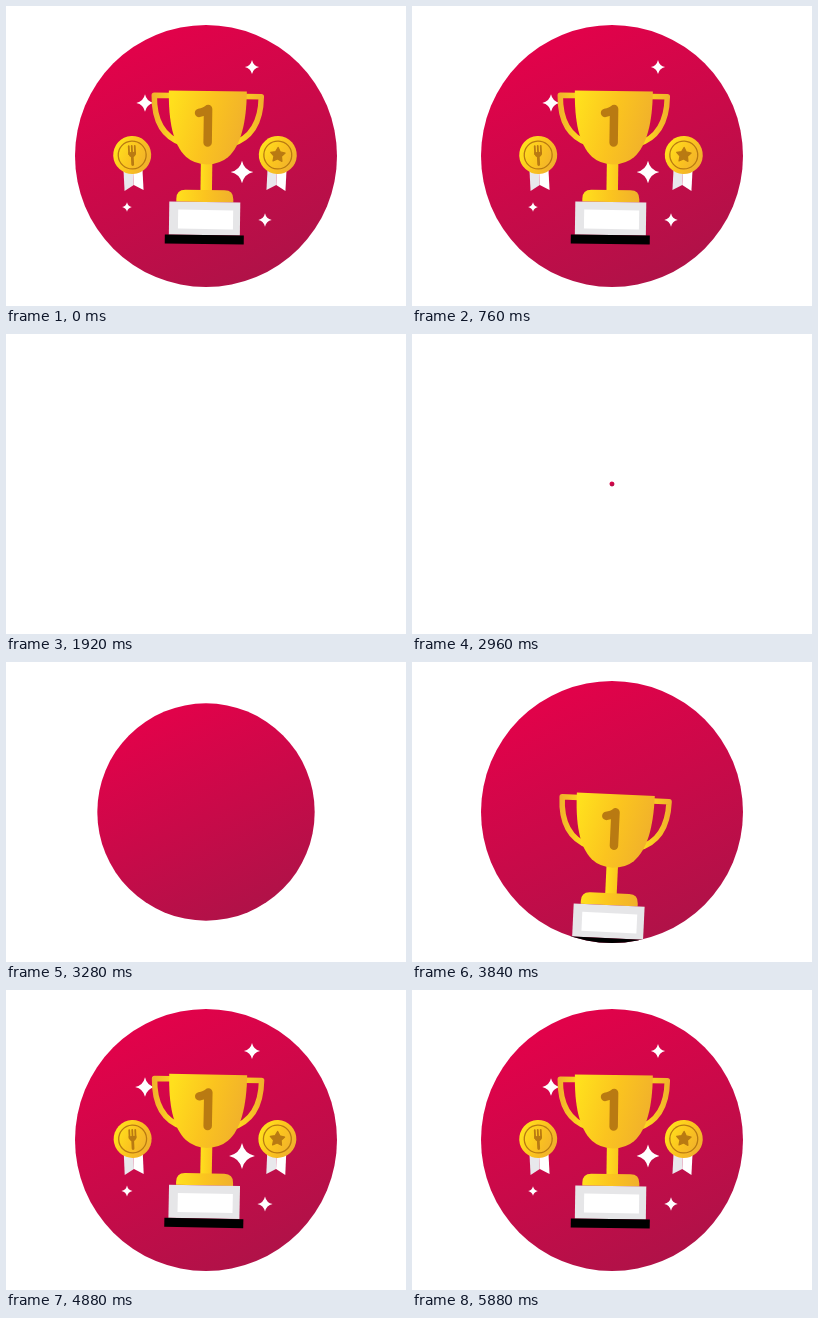
Animation, 400 px wide and 300 px high, one loop 5.92 s. Source, as an HTML page with a canvas:

```html
<!DOCTYPE html>
<html lang="en">
<head>
<meta charset="utf-8">
<title>Trophy</title>
<style>
html, body { margin: 0; width: 100%; height: 100%; overflow: hidden; background: #fff; }
canvas { display: block; width: 400px; height: 300px; }
</style>
</head>
<body>
<canvas id="stage"></canvas>
<script>
const canvas = document.getElementById('stage');
const ratio = window.devicePixelRatio || 1;
canvas.width = 400 * ratio;
canvas.height = 300 * ratio;
const c = canvas.getContext('2d');

const LOOP = 5920, STEP = 40, RADIUS = 131;
const BROWN = '#b97a12', YELLOW = '#ffe01d', GOLD = '#fbc41f', ORANGE = '#f0b02c';

// Progress from 0 to 1, linear and eased.
const ramp = (t, begin, time) => Math.min(1, Math.max(0, (t - begin) / time));
const ease = (t, begin, time) => {
  const u = ramp(t, begin, time);
  return u * u * (3 - 2 * u);
};

// 1 while a part is on stage, 0 while it is away.
const shown = (t, leave, leaveTime, enter, enterTime) =>
  1 - ease(t, leave, leaveTime) + ease(t, enter, enterTime);

// Damped swing that follows the arrival of the trophy.
function spring(t) {
  const u = Math.max(0, t - 3980);
  return Math.exp(-u / 250) * Math.sin(2 * Math.PI * u / 1000);
}

function gradient(x0, y0, x1, y1, ...colors) {
  const g = c.createLinearGradient(x0, y0, x1, y1);
  colors.forEach((color, i) => g.addColorStop(i / (colors.length - 1), color));
  return g;
}

function fill(path, style) {
  c.fillStyle = style;
  c.fill(new Path2D(path));
}

function stroke(path, style, width, cap = 'butt') {
  c.strokeStyle = style;
  c.lineWidth = width;
  c.lineCap = cap;
  c.lineJoin = 'round';
  c.stroke(new Path2D(path));
}

function box(x, y, w, h, style) {
  c.fillStyle = style;
  c.fillRect(x, y, w, h);
}

function disc(r, style) {
  c.fillStyle = style;
  c.beginPath();
  c.arc(0, 0, r, 0, 2 * Math.PI);
  c.fill();
}

function group(x, y, angle, scale, draw) {
  if (scale <= 0) return;
  c.save();
  c.translate(x, y);
  c.rotate(angle * Math.PI / 180);
  c.scale(scale, scale);
  draw();
  c.restore();
}

function sparkle(r) {
  const k = r * 0.18;
  fill(`M0 ${-r}Q${k} ${-k} ${r} 0Q${k} ${k} 0 ${r}Q${-k} ${k} ${-r} 0Q${-k} ${-k} 0 ${-r}Z`, '#fff');
}

function fork() {
  for (const x of [-3, 0, 3]) stroke(`M${x} -9V-1`, BROWN, 1.8, 'round');
  fill('M-3.9 -3H3.9Q3.9 2 0 2.5Q-3.9 2 -3.9 -3Z', BROWN);
  stroke('M0 0V9.5', BROWN, 2.8, 'round');
}

function fivePoint() {
  let path = '';
  for (let i = 0; i < 10; i++) {
    const r = i % 2 ? 4 : 7.6, a = (i / 5 - 0.5) * Math.PI;
    path += `${i ? 'L' : 'M'}${r * Math.cos(a)} ${r * Math.sin(a)}`;
  }
  fill(path + 'Z', BROWN);
  stroke(path + 'Z', BROWN, 1.2, 'round');
}

function medal(icon) {
  fill('M-9.5 14H0V30L-9.5 35.5Z', '#e8e8ec');
  fill('M0 14H9.5V35.5L0 30Z', '#fff');
  const shine = gradient(-16, -8, 16, 8, YELLOW, GOLD, ORANGE);
  disc(19, shine);
  disc(14.6, BROWN);
  disc(13.3, shine);
  icon();
}

function trophy() {
  stroke('M164 90H147.5C147.5 112 154 131 177 138', gradient(145, 0, 172, 0, ORANGE, YELLOW), 5.5);
  stroke('M238 90H254.5C254.5 112 248 131 225 138', gradient(228, 0, 257, 0, YELLOW, ORANGE), 5.5);
  box(195, 152, 11.5, 34, gradient(195, 0, 207, 0, YELLOW, GOLD));
  fill('M162 85H240C240 116 235 139 222 151Q214 158 201 158.5Q188 158 180 151C167 139 162 116 162 85Z',
    gradient(162, 105, 240, 125, YELLOW, GOLD, ORANGE));
  fill('M171 196V193Q171 184 180 184H219Q228 184 228 193V196Z', gradient(171, 0, 228, 0, YELLOW, GOLD, ORANGE));
  stroke('M192.5 107Q199 105.5 201.5 103V136.5', BROWN, 8.5, 'round');
  box(164, 196, 71, 33, '#e6e6e8');
  box(173, 204, 55, 19, '#fff');
  box(160, 229, 79, 9, '#000');
}

function drawStars(t) {
  const stars = [[246, 61, 7.6], [139, 97, 9.3], [236, 166, 12.2], [121, 201, 5.2], [259, 214, 7.2]];
  stars.forEach(([x, y, r], i) => {
    const twinkle = 1 - 0.07 * Math.cos(2 * Math.PI * t / 740);
    const size = shown(t, 780 + 30 * i, 260, 3840 + 30 * i, 260);
    group(x, y, 0, size * twinkle, () => sparkle(r));
  });
}

function drawDashes(t) {
  const reach = late => 85 + 35 * ease(t - late, 4080, 160);
  for (const [y, late] of [[153, 0], [166, 100]]) {
    const head = reach(late), tail = reach(late + 60);
    if (head <= tail) continue;
    for (const side of [-1, 1]) {
      stroke(`M${200 + side * tail} ${y}H${200 + side * head}`, '#fff', 2.6);
    }
  }
}

function drawMedals(t) {
  const out = shown(t, 900, 240, 3940, 240);
  const dx = 72.8 * out + 27 * spring(t);
  const angle = 3 * out + 28 * spring(t);
  group(199 - dx, 149, -angle, out, () => medal(fork));
  group(199 + dx, 149, angle, out, () => medal(fivePoint));
}

function drawTrophy(t) {
  const away = 1 - shown(t, 1080, 380, 3530, 450);
  const drop = 205 * away + 35 * spring(t);
  const tilt = 0.8 + 8.2 * away - 19 * spring(t);
  group(200, 146 + drop, tilt, 1, () => {
    c.translate(-200, -146);
    trophy();
  });
}

function render(t) {
  c.setTransform(ratio, 0, 0, ratio, 0, 0);
  box(0, 0, 400, 300, '#fff');
  const size = 1 - ramp(t, 1460, 460) ** 2.13 + ease(t, 2920, 488);
  group(200, 150, 0, size, () =>
    disc(RADIUS, gradient(-52, -115, 60, 118, '#e1024a', '#b01248')));

  c.save();
  c.beginPath();
  c.arc(200, 150, RADIUS * size, 0, 2 * Math.PI);
  c.clip();
  drawStars(t);
  drawDashes(t);
  drawMedals(t);
  drawTrophy(t);
  c.restore();
}

const start = performance.now();
function tick() {
  const t = (performance.now() - start) % LOOP;
  render(Math.floor(t / STEP) * STEP);
  requestAnimationFrame(tick);
}
tick();
</script>
</body>
</html>
```
